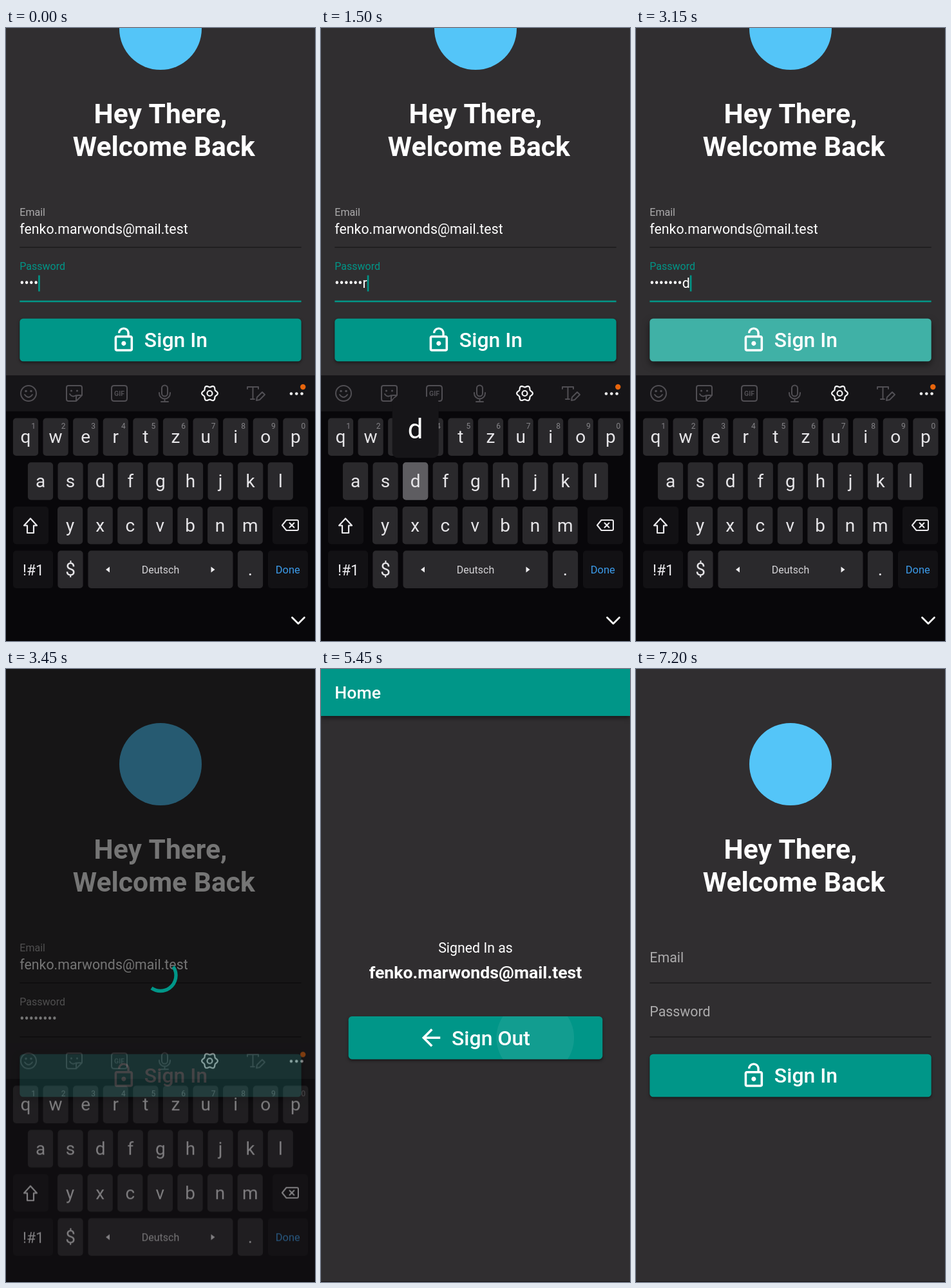
Write an HTML page with a canvas that moves like this. It is 480 px wide and 953 px high and loops after 8.75 s.

```html
<!DOCTYPE html>
<html lang="en">
<head>
<meta charset="utf-8">
<title>Sign in</title>
<style>
html, body { margin: 0; width: 100%; height: 100%; overflow: hidden; background: #302e30; }
canvas { display: block; }
</style>
</head>
<body>
<canvas id="stage" width="480" height="953"></canvas>
<script>
const W = 480, H = 953, LOOP = 8750, KEYBOARD_SCROLL = 147;
const BG = '#302e30', TEAL = '#009688', GREY = 'rgba(255,255,255,.6)';
const EMAIL = 'fenko.marwonds@mail.test', PASSWORD = 'password';
const LOCK = new Path2D('M12 17c1.1 0 2-.9 2-2s-.9-2-2-2-2 .9-2 2 .9 2 2 2zm6-9h-1V6c0-2.76-2.24-5-5-5S7 3.24 7 6h1.9c0-1.71 1.39-3.1 3.1-3.1 1.71 0 3.1 1.39 3.1 3.1v2H6c-1.1 0-2 .9-2 2v10c0 1.1.9 2 2 2h12c1.1 0 2-.9 2-2V10c0-1.1-.9-2-2-2zm0 12H6V10h12v10z');
const ARROW = new Path2D('M20 11H7.83l5.59-5.59L12 4l-8 8 8 8 1.41-1.41L7.83 13H20v-2z');

const screen = document.getElementById('stage').getContext('2d');
const keyboard = document.createElement('canvas');
keyboard.width = W;
keyboard.height = H;
let g = screen;

const clamp = v => Math.max(0, Math.min(1, v));
const mix = (a, b, p) => a + (b - a) * p;
const ramp = (t, start, length) => clamp((t - start) / length);

function text(str, x, y, size, color = '#fff', weight = 400, align = 'left') {
  g.font = `${weight} ${size}px Roboto, sans-serif`;
  g.textAlign = align;
  g.fillStyle = color;
  g.fillText(str, x, y);
}
const centered = (str, x, y, size, color, weight) => text(str, x, y, size, color, weight, 'center');

function rect(x, y, w, h, color, radius = 0) {
  g.beginPath();
  g.roundRect(x, y, w, h, radius);
  g.fillStyle = color;
  g.fill();
}
function disc(x, y, r, color) {
  g.beginPath();
  g.arc(x, y, r, 0, 7);
  g.fillStyle = color;
  g.fill();
}
function stroke(d, color, width = 2) {
  g.strokeStyle = color;
  g.lineWidth = width;
  g.stroke(new Path2D(d));
}
function withShadow(blur, dy, draw) {
  g.save();
  g.shadowColor = 'rgba(0,0,0,.5)';
  g.shadowBlur = blur;
  g.shadowOffsetY = dy;
  draw();
  g.restore();
}

// Material button; the ripple grows from the tap towards the centre
function button(x, y, label, icon, t, tapTime, tapX) {
  const w = W - 2 * x, h = 66.67, lift = ramp(t, tapTime, 200);
  withShadow(mix(4, 11, lift), mix(2, 5, lift), () => rect(x, y, w, h, TEAL, 5.33));
  if (t > tapTime) {
    const p = ramp(t, tapTime, 820), e = p * p * (3 - 2 * p), reach = Math.hypot(w, h) / 2;
    g.save();
    g.beginPath();
    g.roundRect(x, y, w, h, 5.33);
    g.clip();
    disc(mix(tapX, 240, e), y + h / 2, mix(reach * .3, reach + 5, e),
      `rgba(255,255,255,${.25 * ramp(t, tapTime, 75)})`);
    g.restore();
  }
  g.font = '500 32px Roboto, sans-serif';
  const left = 237.33 - (53.33 + g.measureText(label).width) / 2;
  g.save();
  g.translate(left, y + h / 2 - 21.33);
  g.scale(1.778, 1.778);
  g.fillStyle = '#fff';
  g.fill(icon);
  g.restore();
  text(label, left + 53.33, y + 44.7, 32, '#fff', 500);
}

function field(label, value, y, focused, cursorOn) {
  const x = 21.33;
  if (value || focused) text(label, x, y - 49, 16, focused ? TEAL : GREY);
  else text(label, x, y - 32.5, 21.33, GREY);
  text(value, x, y - 21, 21.33);
  if (cursorOn) rect(x + g.measureText(value).width, y - 40.5, 2.67, 25, TEAL);
  if (focused) rect(x, y - 1.33, 437.33, 2.67, TEAL);
  else rect(x, y - .67, 437.33, 1.33, '#1b1a1b');
}

// Key presses: character, press time, release time
const presses = [['w', 100, 300], ['o', 750, 950], ['r', 1100, 1300], ['d', 1450, 1600]];

function typedPassword(t) {
  if (t >= 3300) return '•'.repeat(PASSWORD.length);
  const count = 4 + presses.filter(p => t >= p[2]).length;
  return count === 4 ? '••••' : '•'.repeat(count - 1) + PASSWORD[count - 1];
}

function loginPage(t) {
  const signedOut = t >= 6600, focused = t < 3300;
  rect(0, 0, W, H, BG);
  g.save();
  if (t < 3350) g.translate(0, -KEYBOARD_SCROLL);
  disc(240, 148, 64, '#54c5f8');
  centered('Hey There,', 240, 295, 42.67, '#fff', 700);
  centered('Welcome Back', 245.3, 346, 42.67, '#fff', 700);
  const cursorOn = focused && !(t >= 2000 && t < 2500);
  field('Email', signedOut ? '' : EMAIL, 488, false, false);
  field('Password', signedOut ? '' : typedPassword(t), 572, focused, cursorOn);
  button(21.33, 598.67, 'Sign In', LOCK, signedOut ? 0 : t, 2330, 300);
  g.restore();
}

function homePage(t) {
  rect(0, 0, W, H, BG);
  withShadow(7, 3, () => rect(0, 0, W, 73, TEAL));
  text('Home', 21.33, 46, 26.67, '#fff', 500);
  centered('Signed In as', 240, 440.5, 21.33);
  centered(EMAIL, 240, 480.5, 26.67, '#fff', 700);
  button(42.67, 540, 'Sign Out', ARROW, t, 5430, 333);
}

const PITCH = 46.6;
const rows = [['qwertzuiop', 30.5, 606.5], ['asdfghjkl', 53.5, 675.3], ['yxcvbnm', 99.6, 744]];

function key(x, y, w, color = '#2a292c') {
  rect(x, y, w, 58.5, color, 5);
}
function letterKey(char, cx, y, color) {
  key(cx - 19.6, y, 39.2, color);
  centered(char, cx, y + 38.5, 28, '#e6e5e8');
}
function hint(i) {
  centered((i + 1) % 10, 42.5 + i * PITCH, 622.5, 12, '#858488');
}

function toolbar() {
  const dim = '#504e53';
  g.lineCap = g.lineJoin = 'round';
  stroke('M23 568a12 12 0 1 0 24 0a12 12 0 1 0-24 0M29 570q6 8 12 0', dim);
  disc(31, 564.5, 1.8, dim);
  disc(39, 564.5, 1.8, dim);
  stroke('M97 556h18q3 0 3 3v12l-9 9h-12q-3 0-3-3v-18q0-3 3-3M118 571h-6q-3 0-3 3v6M99 569q4 6 10 2', dim);
  disc(101.5, 564, 1.6, dim);
  disc(110.5, 564, 1.6, dim);
  stroke('M168 556h16q4 0 4 4v16q0 4-4 4h-16q-4 0-4-4v-16q0-4 4-4', dim);
  centered('GIF', 176, 571.8, 10.5, dim, 700);
  stroke('M242 560a4.5 4.5 0 0 1 9 0v8a4.5 4.5 0 0 1-9 0zM238 567v1a8.5 8.5 0 0 0 17 0v-1M246.5 577v4M241 581h11', dim);
  stroke('M375 561v-3h17v3M383.500 558v19M380 577h6M389 579l1-5l8-8l4 4l-8 8z', dim);

  g.beginPath();
  for (let a = 0; a < 6.28; a += .1) {
    const r = 11 + 1.4 * Math.cos(6 * a);
    g.lineTo(316.5 + r * Math.sin(a + .52), 568 + r * Math.cos(a + .52));
  }
  g.closePath();
  g.strokeStyle = '#f4f4f5';
  g.lineWidth = 2.2;
  g.stroke();
  stroke('M312.500 568a4 4 0 1 0 8 0a4 4 0 1 0-8 0', '#f4f4f5', 2.2);
  for (const x of [443, 451.3, 459.6]) disc(x, 568.5, 2.3, '#f4f4f5');
  disc(461.3, 558, 4.2, '#e8650c');
}

function drawKeyboard() {
  rect(0, 540, W, 413, '#08070a');
  rect(0, 540, W, 56, '#161518');
  toolbar();
  for (const [chars, x, y] of rows) [...chars].forEach((c, i) => letterKey(c, x + i * PITCH, y));
  for (let i = 0; i < 10; i++) hint(i);

  const dark = '#121114', light = '#ecebee';
  key(11, 744, 55, dark);
  key(414, 744, 55, dark);
  key(11, 812.5, 62, dark);
  key(407, 812.5, 62, dark);
  key(127.5, 812.5, 225, '#2a292c');
  letterKey('$', 100, 812.5);
  letterKey('.', 379.5, 812.5);
  stroke('M38 762.500l10 11h-5v11.500h-10v-11.500h-5z', light, 2.2);
  stroke('M429 773l6.500-8h16.500q2 0 2 2v12q0 2-2 2h-16.500zM440.500 769.500l7 7M447.500 769.500l-7 7', light, 2);
  centered('!#1', 42.5, 850.5, 23, light);
  centered('Deutsch', 240, 848, 16, '#d3d2d5');
  centered('Done', 437.7, 848, 16.5, '#3b9ae8');
  g.fillStyle = light;
  g.fill(new Path2D('M155 842l6-4.500v9zM324.500 842l-6-4.500v9z'));
  stroke('M444.500 916.500l9.500 9.500l9.500-9.500', '#fff', 2.8);
}

function pressedKey(char) {
  const [chars, x0, y] = rows.find(r => r[0].includes(char));
  const i = chars.indexOf(char), cx = x0 + i * PITCH;
  letterKey(char, cx, y, '#5e5d61');
  if (y === rows[0][2]) hint(i);
  rect(cx - 36, y - 102, 72, 95, '#161518', 9);
  centered(char, cx, y - 37.5, 42, '#fff');
}

function spinner(t, alpha) {
  const rad = Math.PI / 180, dt = t - 3450;
  g.globalAlpha = alpha;
  g.beginPath();
  g.arc(240, 476.5, 24, (-35 + .267 * dt) * rad, (125 + .65 * dt) * rad);
  g.strokeStyle = TEAL;
  g.lineWidth = 5.33;
  g.lineCap = 'butt';
  g.stroke();
  g.globalAlpha = 1;
}

function draw(t) {
  if (t >= 3600 && t < 6600) homePage(t);
  else loginPage(t);

  // Loading dialog over the page
  const fade = ramp(t, 3270, 150) * (1 - ramp(t, 3600, 170));
  if (fade > 0) {
    rect(0, 0, W, H, `rgba(0,0,0,${.54 * fade})`);
    spinner(t, fade);
  }

  // Keyboard slides down while it fades
  const hide = ramp(t, 3300, 300);
  if (hide < 1) {
    g.globalAlpha = 1 - hide;
    g.drawImage(keyboard, 0, 82 * hide);
    g.globalAlpha = 1;
  }
  const press = presses.find(p => t >= p[1] && t < p[2]);
  if (press) pressedKey(press[0]);
  rect(0, 952, W, 1, 'rgba(0,0,0,.5)');
}

g = keyboard.getContext('2d');
drawKeyboard();
g = screen;

const begin = performance.now();
function tick() {
  draw((performance.now() - begin) % LOOP);
  requestAnimationFrame(tick);
}
tick();
</script>
</body>
</html>
```
